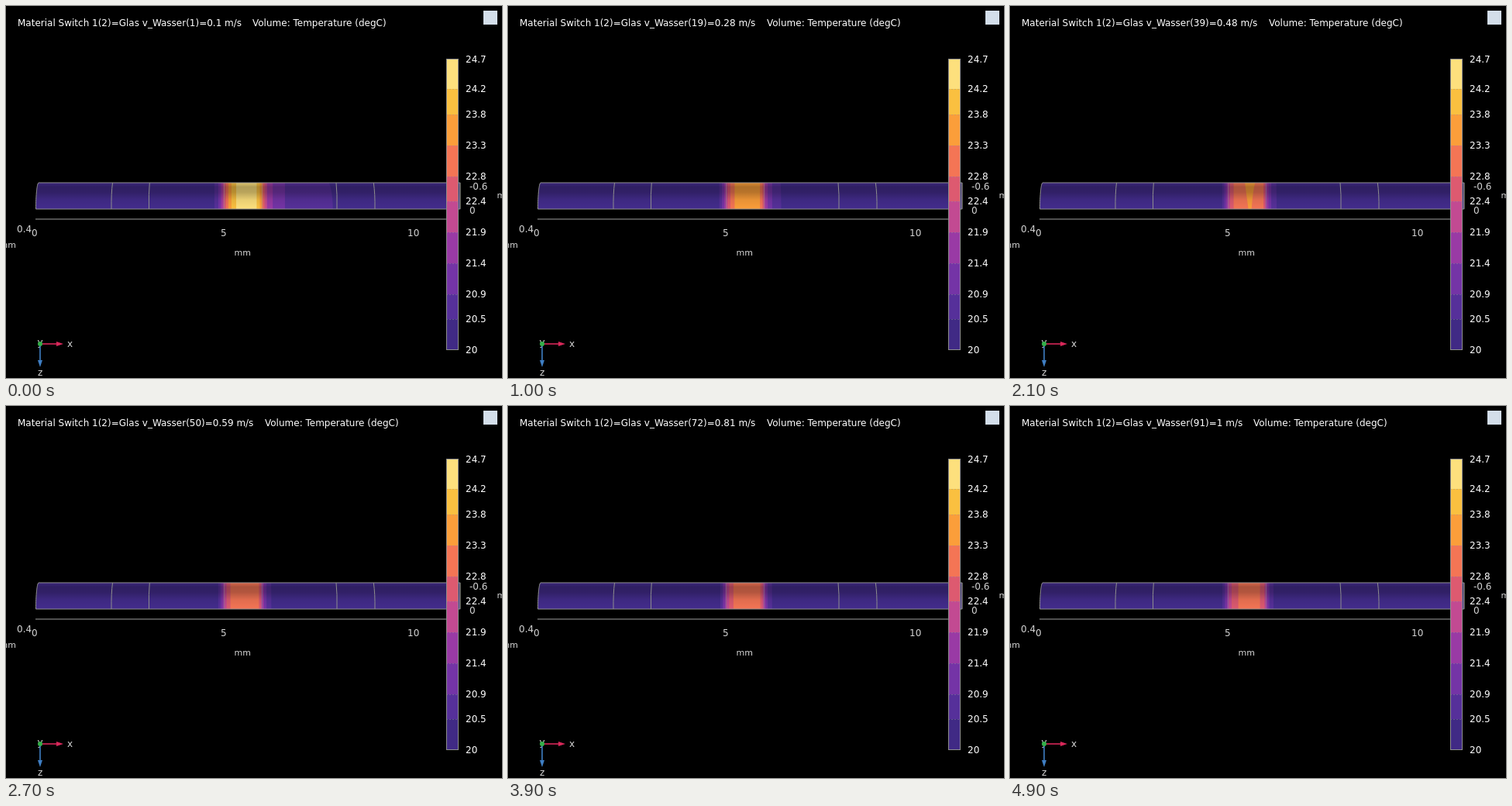
These frames come from a looping animation (640x480 px, 5 s). An HTML page:

```html
<!DOCTYPE html>
<html lang="en">
<head>
<meta charset="utf-8">
<title>Temperature sweep</title>
<style>
  html, body { margin: 0; width: 100%; height: 100%; overflow: hidden; background: #000; }
  svg { display: block; width: 640px; height: 480px; }
  text { font: 12px "DejaVu Sans", sans-serif; fill: #fff; white-space: pre; }
  .axis text { fill: #d4d4d4; }
  .axis .unit { font-size: 11px; }
  .edge { fill: none; stroke: #8e8e8e; }
</style>
</head>
<body>
<svg viewBox="0 0 640 480" xmlns="http://www.w3.org/2000/svg">
  <defs>
    <linearGradient id="shade" x1="0" y1="0" x2="0" y2="1">
      <stop offset="0" stop-opacity=".12"/>
      <stop offset=".16" stop-opacity=".3"/>
      <stop offset=".36" stop-opacity=".27"/>
      <stop offset=".65" stop-opacity=".08"/>
      <stop offset="1" stop-opacity="0"/>
    </linearGradient>
    <clipPath id="tube"><path d="M38.5 262C38.5 244 40 229 42 228H586V262Z"/></clipPath>
  </defs>
  <rect width="640" height="480"/>

  <g clip-path="url(#tube)">
    <rect x="38" y="228" width="549" height="34" fill="#432c8c"/>
    <g id="bands"></g>
    <rect x="38" y="228" width="549" height="34" fill="url(#shade)"/>
  </g>
  <g class="edge">
    <path d="M38.5 262C38.5 244 40 229 42 228H586V262Z"/>
    <path d="M136 262Q135.7 242 137.5 228M184.5 262Q184 242 185.3 228M427 262Q427.5 242 426 228M476 262Q476.3 242 474.3 228"/>
    <path d="M281.5 262V228M330.5 262V228" opacity=".4"/>
    <path d="M38 275H568" stroke="#a0a0a0"/>
    <path d="M585.5 228V262"/>
  </g>

  <g class="axis">
    <text x="33" y="297">0</text>
    <text x="277" y="297">5</text>
    <text x="518" y="297">10</text>
    <text x="14" y="292">0.4</text>
    <text x="598" y="237">-0.6</text>
    <text x="598" y="268">0</text>
    <text class="unit" x="294.5" y="322">mm</text>
    <text class="unit" x="-8.5" y="312">mm</text>
    <text class="unit" x="633.5" y="248">mm</text>
  </g>

  <g id="legend"></g>

  <g class="axis">
    <text x="40.5" y="438">y</text>
    <path d="M44 436H67" stroke="#d8285a" stroke-width="1.6"/>
    <path d="M65 433L74 436L65 439Z" fill="#d8285a"/>
    <path d="M44 436V459" stroke="#3f7fc4" stroke-width="1.6"/>
    <path d="M41 457L44 466L47 457Z" fill="#3f7fc4"/>
    <circle cx="44" cy="436" r="3" fill="#35b04a"/>
    <text x="79" y="440">x</text>
    <text x="41" y="477">z</text>
  </g>

  <rect x="616" y="6" width="18" height="18" fill="#d3deea"/>
  <text id="param" x="15" y="26"></text>
  <text id="quantity" y="26">Volume: Temperature (degC)</text>
</svg>
<script>
const NS = "http://www.w3.org/2000/svg";
const LOOP = 5000, STEP = 100, FRAMES = LOOP / STEP;
const TOP = 228, BOTTOM = 262;
const colors = ["#402a85", "#56309a", "#7434a6", "#993aa5", "#c24a92",
                "#dd5a70", "#f47555", "#fb9e3a", "#fac040", "#fde07d"];
const ticks = [444, 404, 372, 332, 292, 252, 220, 180, 140, 107, 69];
const labels = ["20", "20.5", "20.9", "21.4", "21.9", "22.4", "22.8", "23.3", "23.8", "24.2", "24.7"];

// Isotherm positions for 0..100 % of the peak, at slow and fast flow
const leftSlow  = [264, 269, 274, 277, 279.5, 281.5, 284, 287, 291, 297, 310];
const leftFast  = [271, 273, 275, 277, 279, 280.5, 282, 284, 287, 291, 310];
const rightSlow = [350, 346, 343, 340, 337, 334.5, 332, 330, 327.5, 323.5, 310];
const rightFast = [334, 333, 332.5, 332, 331.5, 331, 330, 329, 328, 325.5, 310];

const byId = id => document.getElementById(id);

function add(parent, tag, attrs, content = "") {
  const el = document.createElementNS(NS, tag);
  for (const key in attrs) el.setAttribute(key, attrs[key]);
  el.textContent = content;
  parent.append(el);
  return el;
}

function sample(points, f) {
  const i = Math.min(9, Math.floor(f * 10));
  return points[i] + (points[i + 1] - points[i]) * (f * 10 - i);
}

const legend = byId("legend");
colors.forEach((fill, i) => add(legend, "rect",
  { x: 568, y: ticks[i + 1], width: 16, height: ticks[i] - ticks[i + 1], fill }));
add(legend, "path", { d: ticks.slice(1, -1).map(y => `M568 ${y + .5}H584`).join(""),
  stroke: "#999", "stroke-dasharray": "2 2", opacity: .4 });
add(legend, "rect", { x: 568.5, y: 68.5, width: 15, height: 375, fill: "none", stroke: "#8e8e8e" });
labels.forEach((label, i) => add(legend, "text", { x: 593, y: ticks[i] + 4 }, label));

const bands = colors.slice(1).map(fill => add(byId("bands"), "path", { fill }));

// The three coolest isotherms trail downstream
function wakeEdge(level, v) {
  if (level === 1) return 338.5 + 1.55 * v ** -1.73;
  if (level === 2) return 333 + 1.7 * v ** -1.2;
  return 331.5 + .8 * v ** -1.2;
}

function bandPath(level, v) {
  const peak = 5.5 + 1.03 * v ** -.64;
  const f = level / peak;
  if (f >= 1) return "";
  const mix = Math.min(1, (v - .1) / .25);
  const blend = (slow, fast) => sample(slow, f) * (1 - mix) + sample(fast, f) * mix;
  const left = blend(leftSlow, leftFast);
  const right = level < 4 ? wakeEdge(level, v) : blend(rightSlow, rightFast);
  const flare = f > .93 ? 3 : 0;
  const lean = level === 1 ? Math.min(5, (right - 338) / 17) : 0;
  return `M${left - flare} ${TOP}H${right + flare - lean}` +
    `Q${right} ${TOP + 12} ${right - flare / 2} ${BOTTOM}H${left + flare / 2}Z`;
}

function draw(time) {
  const frame = Math.floor((time % LOOP) / STEP);
  const index = Math.floor(frame * 90 / (FRAMES - 1));
  const v = (10 + index) / 100;
  const run = String(index + 1), speed = String(v);
  byId("param").textContent = `Material Switch 1(2)=Glas v_Wasser(${run})=${speed} m/s`;
  const digits = (run + speed).replace(".", "").length;
  const dots = speed.includes(".") ? 1 : 0;
  byId("quantity").setAttribute("x", 290 + 8 * digits + 4 * dots);
  bands.forEach((band, i) => band.setAttribute("d", bandPath(i + 1, v)));
}

const start = performance.now();
function tick() {
  draw(performance.now() - start);
  requestAnimationFrame(tick);
}
tick();
</script>
</body>
</html>
```
